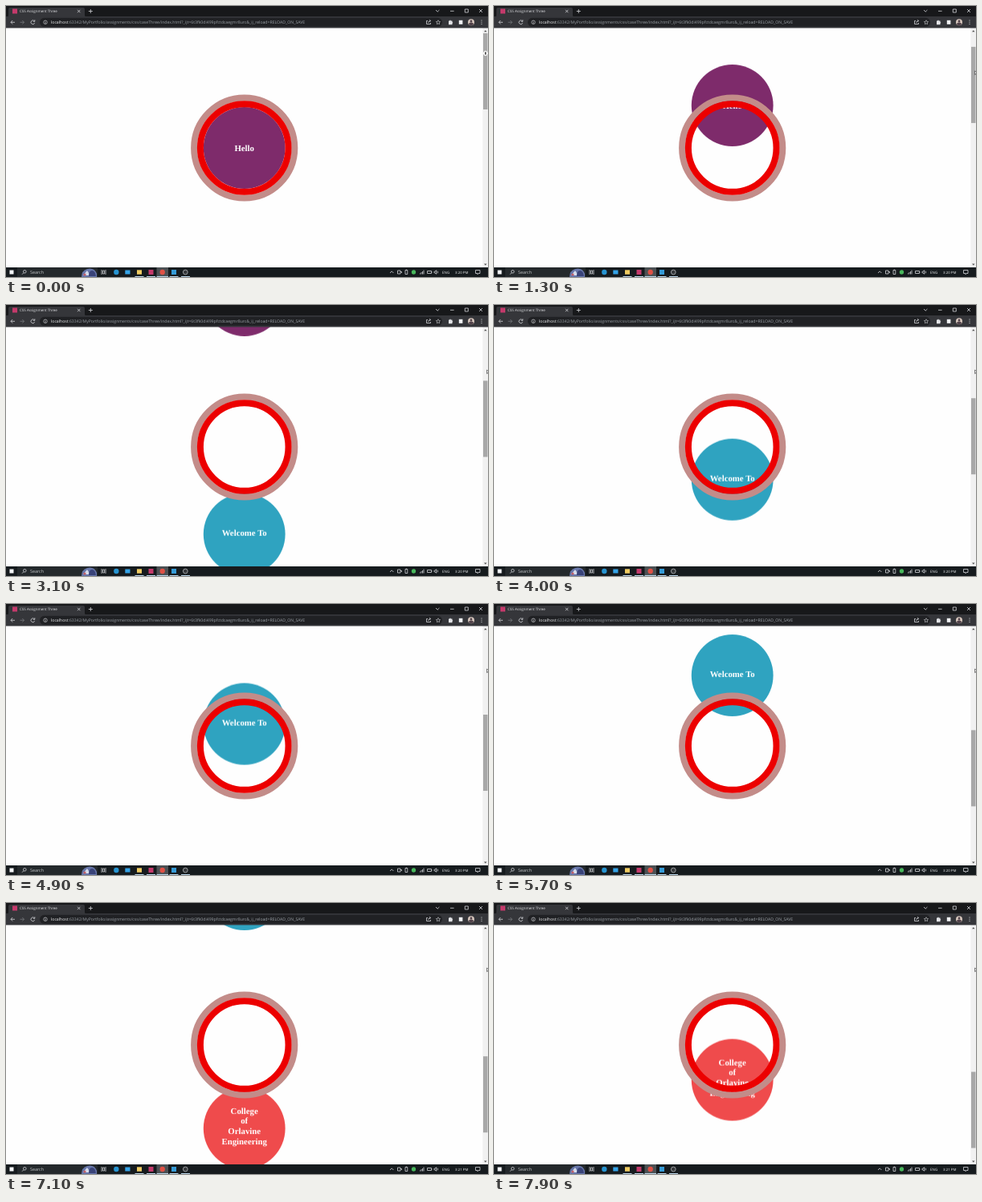
These frames come from a looping animation (600x338 px, 8000 ms). An HTML page:

```html
<!DOCTYPE html>
<html lang="en">
<head>
<meta charset="utf-8">
<title>CSS Assignment Three</title>
<style>
  html, body { margin: 0; width: 100%; height: 100%; overflow: hidden; background: #fefefe; }
  svg { display: block; width: 100vw; height: 100vh; }
  text { text-rendering: geometricPrecision; }
  .ui { font-family: "Open Sans", "Noto Sans", sans-serif; }
  .page { font: bold 10.8px "Liberation Serif", "Times New Roman", serif; text-anchor: middle; fill: #fff; }
  .line { fill: none; stroke: #d3d5d8; stroke-width: .8; }
  .dim { stroke: #77797d; }

  /* Rest for 600 ms, then scroll at an even speed in 100 ms ticks. */
  .page, .thumb { animation: 8s infinite; }
  .page { animation-name: scroll; }
  .thumb { animation-name: drag; }
  @keyframes scroll {
    0% { transform: translateY(0); }
    7.5% { transform: translateY(0); animation-timing-function: steps(74, end); }
    100% { transform: translateY(-560px); }
  }
  @keyframes drag {
    0% { transform: translateY(0); }
    7.5% { transform: translateY(0); animation-timing-function: steps(74, end); }
    100% { transform: translateY(179px); }
  }

  .before, .after, .grip, .pointer { animation: 8s step-end infinite; }
  .before { animation-name: hide-minute; }
  .after { animation-name: show-minute; }
  .grip { animation-name: hide-grip; }
  .pointer { animation-name: show-pointer; }
  @keyframes hide-minute { 0% { opacity: 1; } 85%, 100% { opacity: 0; } }
  @keyframes show-minute { 0% { opacity: 0; } 85%, 100% { opacity: 1; } }
  @keyframes hide-grip { 0% { opacity: 1; } 2.5%, 100% { opacity: 0; } }
  @keyframes show-pointer {
    0% { opacity: 0; transform: translateY(-24px); }
    2.5% { opacity: 1; transform: translateY(-16px); }
    5% { opacity: 1; transform: translateY(-6px); }
    7.5%, 100% { opacity: 1; transform: none; }
  }
</style>
</head>
<body>
<svg viewBox="0 0 600 338" preserveAspectRatio="none">
  <rect width="600" height="338" fill="#fefefe"/>

  <!-- Scrolling page -->
  <g class="page">
    <g transform="translate(296.7 177)">
      <circle r="50.9" fill="#7e2b6b"/>
      <text y="4">Hello</text>
    </g>
    <g transform="translate(296.7 475)">
      <circle r="50.9" fill="#2fa3c0"/>
      <text y="2.2">Welcome To</text>
    </g>
    <g transform="translate(296.7 773)">
      <circle r="50.9" fill="#ef4b4c"/>
      <text y="-18.3">College</text>
      <text y="-5.6">of</text>
      <text y="7.1">Orlavine</text>
      <text y="19.8">Engineering</text>
    </g>
  </g>

  <!-- Fixed ring -->
  <g fill="none" stroke-width="8">
    <circle cx="296.7" cy="177" r="62.6" stroke="#c38c89"/>
    <circle cx="296.7" cy="177" r="54.8" stroke="#ec0000"/>
  </g>

  <!-- Scrollbar -->
  <rect x="593.3" y="27" width="6.7" height="299" fill="#f1f1f1"/>
  <path d="M595 32.2l1.8-2 1.8 2zM595 321.4l1.8 2 1.8-2z" fill="#505050"/>
  <rect class="thumb" x="594" y="34" width="5.5" height="95" fill="#a8a8a8"/>
  <g class="grip">
    <path d="M593.2 59l2-2v4zM600 59l-1.6-2v4z" fill="#fff"/>
    <ellipse cx="596.9" cy="59" rx="1.6" ry="2.6" fill="#555" stroke="#fff" stroke-width="1.2"/>
  </g>
  <path class="pointer" d="M598.6 81v4.6l1.1-1 .8 1.6V82.6z" fill="#fff" stroke="#222" stroke-width=".6"/>

  <!-- Browser frame -->
  <rect width="600" height="13.5" fill="#17181a"/>
  <path d="M1 13.5q2 0 2-2V4q0-2 2-2h91q2 0 2 2v7.500q0 2 2 2z" fill="#35363a"/>
  <rect y="13" width="600" height="14.5" fill="#35363a"/>
  <rect x="42" y="14.8" width="501" height="11" rx="5.5" fill="#202124"/>
  <rect x="8" y="3.5" width="6" height="6" fill="#c43a6b"/>
  <g class="ui">
    <text x="17" y="8.300" font-size="4.500" fill="#e4e5e8">CSS Assignment Three</text>
    <text x="56" y="22.200" font-size="5.150" fill="#9aa0a6"><tspan fill="#f0f1f3">localhost</tspan>:63342/MyPortfolio/assignments/css/caseThree/index.html?_ijt=6t3fk0di499pfctdcaegmr8urc&amp;_ij_reload=RELOAD_ON_SAVE</text>
  </g>
  <g class="line">
    <path d="M89 4.800l3.400 3.400m0-3.400l-3.400 3.400M105.300 4v5m-2.500-2.500h5"/>
    <path d="M535 5l2.200 2.200L539.400 5M553 6.300h4.600M571.300 4h4v4h-4zM589 4l4 4m0-4l-4 4"/>
    <path d="M11 20.300H6m2.200-2.300L6 20.300l2.200 2.300"/>
    <path class="dim" d="M17.500 20.300h5m-2.200-2.300l2.200 2.300-2.200 2.300"/>
    <path d="M35.300 18.800a2.400 2.400 0 1 0 .4 2.300M35.800 17.300v2h-2"/>
    <path d="M49 19.800v2M49 18.500v.6"/>
    <circle cx="49" cy="20.300" r="2.300" stroke-width=".6"/>
    <path d="M525 18.500h-1.500v4h5v-1.500M525.500 21q.3-2.500 3-2.500m-1.300-1.400l1.500 1.400-1.500 1.400"/>
    <path d="M538 17.700l.8 1.700 1.800.2-1.300 1.300.3 1.800-1.600-.9-1.600.9.300-1.800-1.300-1.300 1.800-.2z" stroke-width=".6"/>
  </g>
  <path d="M551 18.500h1.200q.8-2 1.600 0h1.700v1.600q1.700.8 0 1.600v1.500H551z" fill="#e4e5e8"/>
  <rect x="563.800" y="17.800" width="4.600" height="5" fill="#f1f2f4"/>
  <circle cx="579" cy="20.300" r="4" fill="#d7c7bd"/>
  <path d="M576 23a3 2.600 0 0 1 6 0q-3 2.500-6 0" fill="#51424a"/>
  <circle cx="579" cy="19" r="1.400" fill="#51424a"/>
  <path d="M591.500 17.600h1v1h-1zM591.500 19.800h1v1h-1zM591.500 22h1v1h-1z" fill="#d3d5d8"/>

  <!-- Taskbar -->
  <rect y="326" width="600" height="12" fill="#161b1e"/>
  <rect x="14" y="326" width="100" height="12" fill="#24292c"/>
  <rect x="4.500" y="329.500" width="5" height="5" fill="#f4f6f8"/>
  <g class="line">
    <circle cx="23.300" cy="331.300" r="1.800"/>
    <path d="M22 332.700l-2 2"/>
    <path d="M119 329v6M124 329v6M120.500 330h2v4h-2z"/>
  </g>
  <path d="M94 338q0-8 7-10 9-2 12 6v4z" fill="#6675a8"/>
  <path d="M96 336l5-6 4 6z" fill="#d5dceb"/>
  <path d="M103 337q0-7 4-7t5 7z" fill="#394378"/>
  <circle cx="98" cy="335" r="1.600" fill="#c05e68"/>

  <rect x="187.500" y="326" width="14.500" height="12" fill="#4b5053"/>
  <circle cx="137.300" cy="332" r="3.200" fill="#2794d1"/>
  <rect x="148.300" y="329.500" width="6.200" height="5" fill="#35a4e8"/>
  <rect x="163" y="329.300" width="6" height="5.400" fill="#f0cc62"/>
  <rect x="177.500" y="329" width="6" height="6" fill="#c43a6b"/>
  <circle cx="194.700" cy="332" r="3.200" fill="#df5145"/>
  <rect x="206" y="329" width="6" height="6" fill="#369bd7"/>
  <circle cx="223.300" cy="332" r="2.900" fill="#35383b" stroke="#c5c8ca" stroke-width=".7"/>
  <path d="M160.500 337.500h11M175 337.500h11M187.500 337.500h14.500M203.500 337.500h11M218 337.500h11" stroke="#b9d4e8"/>

  <g class="line" stroke-width=".7">
    <path d="M478 333l2.200-2.200 2.200 2.200"/>
    <path d="M487.500 330h3.500v4h-3.500zM491 331.500h1.500v1.500"/>
    <path d="M497 329.500h2.800v5H497zM498.400 328.600v.8"/>
    <path d="M515.500 334.500v-1.200m1.500 1.200v-2.500m1.500 2.500V331m1.500 3.500v-5"/>
    <path d="M524.500 330.500h5v3h-5zM530 331.500v1"/>
    <path d="M533 331.200h1l1.500-1.500v4.600l-1.500-1.500h-1zM537 330.500q1.300 1.500 0 3"/>
    <path d="M584.500 329.500h5.500v4h-2l-1 1.300v-1.300h-2.500z"/>
  </g>
  <circle cx="507.500" cy="332" r="2.700" fill="#48b85c"/>
  <g class="ui" fill="#eef0f1">
    <text x="30" y="334" font-size="5.400" fill="#c5c8ca">Search</text>
    <text x="543" y="333.700" font-size="4.500">ENG</text>
    <text class="before" x="559" y="333.700" font-size="4.400">3:20 PM</text>
    <text class="after" x="559" y="333.700" font-size="4.400">3:21 PM</text>
  </g>
</svg>
</body>
</html>
```
